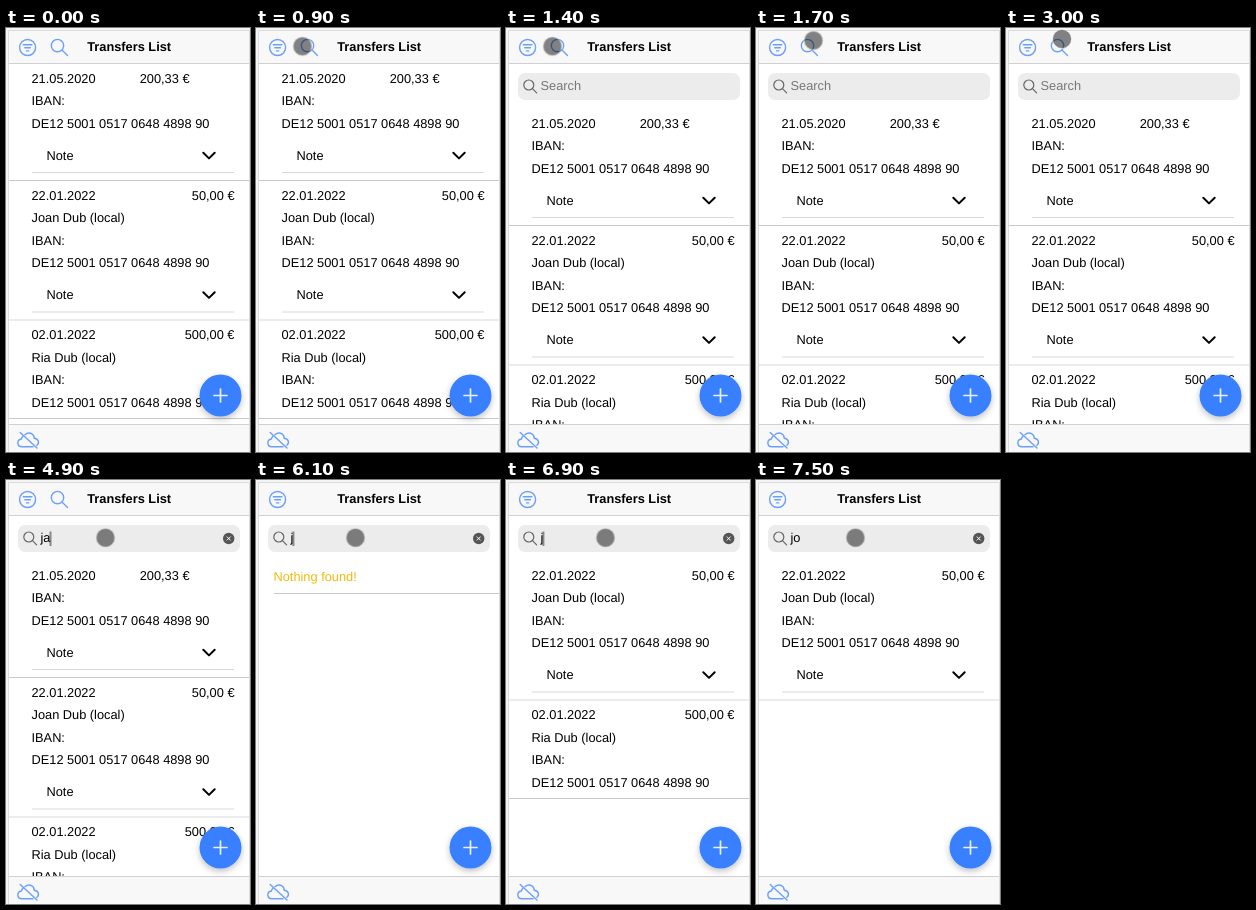
Write an HTML page that moves like this. It is 244 px wide and 424 px high and loops after 8 s.

```html
<!DOCTYPE html>
<html lang="en">
<head>
<meta charset="utf-8">
<title>Transfers List</title>
<style>
html, body { margin: 0; width: 100%; height: 100%; overflow: hidden; background: #f4f4f4; }
svg { display: block; width: 244px; height: 424px; }
text { font: 12.8px "Liberation Sans", Arial, sans-serif; fill: #000; text-rendering: geometricPrecision; }
.title { font-weight: bold; }
.end { text-anchor: end; }
.icon { fill: none; stroke: #6a9ffb; stroke-width: 1.4; stroke-linecap: round; stroke-linejoin: round; }
.rule { stroke: #d9d9db; }
.strong { stroke: #c8c8cb; }

.anim, .anim * { animation: 8s step-end infinite; }
.list { animation-name: list; }
.first, .glass { animation-name: until-search; }
.second { animation-name: second; }
.third { animation-name: third; }
.field { animation-name: field; }
.empty { animation-name: empty; }
.hint { animation-name: hint; }
.typed { animation-name: typed; }
.a { animation-name: letter-a; }
.o { animation-name: letter-o; }
.caret { animation-name: caret; }
.pointer { animation-name: pointer; }

@keyframes list {
  0% { transform: translateY(0); }
  17.5% { transform: translateY(45px); }
  80%, 100% { transform: translateY(-72px); }
}
@keyframes until-search { 0% { opacity: 1; } 65%, 100% { opacity: 0; } }
@keyframes second { 0% { opacity: 1; } 65% { opacity: 0; } 80%, 100% { opacity: 1; } }
@keyframes third { 0% { opacity: 1; } 65% { opacity: 0; } 80% { opacity: 1; } 91.25%, 100% { opacity: 0; } }
@keyframes field { 0% { opacity: 0; } 17.5%, 100% { opacity: 1; } }
@keyframes empty { 0% { opacity: 0; } 65% { opacity: 1; } 80%, 100% { opacity: 0; } }
@keyframes hint { 0% { opacity: 1; } 58.75%, 100% { opacity: 0; } }
@keyframes typed { 0% { opacity: 0; } 58.75%, 100% { opacity: 1; } }
@keyframes letter-a { 0% { opacity: 0; } 61.25% { opacity: 1; } 76.25%, 100% { opacity: 0; } }
@keyframes letter-o { 0% { opacity: 0; } 87.5%, 100% { opacity: 1; } }
@keyframes caret {
  0% { opacity: 0; transform: translateX(0); }
  48.75% { opacity: 1; transform: translateX(0); }
  55% { opacity: 0; transform: translateX(0); }
  58.75% { opacity: 1; transform: translateX(2.4px); }
  61.25% { opacity: 1; transform: translateX(9.5px); }
  67.5% { opacity: 0; transform: translateX(9.5px); }
  73.75% { opacity: 1; transform: translateX(9.5px); }
  76.25% { opacity: 1; transform: translateX(2.4px); }
  81.25% { opacity: 0; transform: translateX(2.4px); }
  86.25% { opacity: 1; transform: translateX(2.4px); }
  87.5% { opacity: 1; transform: translateX(9.5px); }
  93.75%, 100% { opacity: 0; transform: translateX(9.5px); }
}
@keyframes pointer {
  0% { transform: translate(-20px, 18.5px); }
  7.5% { transform: translate(4px, 18.5px); }
  8.75% { transform: translate(24px, 18.5px); }
  10% { transform: translate(40px, 18.5px); }
  11.25% { transform: translate(46.5px, 18.3px); }
  18.75% { transform: translate(49px, 17px); }
  20% { transform: translate(54px, 14px); }
  21.25% { transform: translate(57.5px, 12.5px); }
  37.5% { transform: translate(56px, 11px); }
  40% { transform: translate(62px, 22px); }
  41.25% { transform: translate(84px, 60px); }
  42.5% { transform: translate(101px, 88px); }
  43.75% { transform: translate(97.2px, 77.3px); }
  45% { transform: translate(102px, 58.3px); }
  47.5% { transform: translate(101px, 58px); }
  48.75%, 100% { transform: translate(99.5px, 57.7px); }
}
</style>
</head>
<body>
<svg viewBox="0 0 244 424">
  <defs>
    <clipPath id="view"><path d="M3 36H243V396H3z"/></clipPath>
    <filter id="shadow" x="-50%" y="-50%" width="200%" height="200%">
      <feDropShadow dx="0" dy="2.5" stdDeviation="3" flood-opacity=".25"/>
    </filter>
    <g id="note">
      <text x="40.5" y="131.5">Note</text>
      <path d="M197.3 124.7L203 130.4L208.7 124.7" fill="none" stroke="#000" stroke-width="2" stroke-linecap="round" stroke-linejoin="round"/>
      <path class="rule" d="M26 144.5H228"/>
    </g>
  </defs>

  <path fill="#fff" stroke="#dcdcdc" d="M2.5 430V2.5H243.5V430z"/>

  <g class="anim" clip-path="url(#view)">
    <g class="list">
      <g class="first">
        <text y="55.3"><tspan x="25.5">21.05.2020</tspan><tspan x="133.7">200,33 €</tspan></text>
        <text x="25.5" y="77.4">IBAN:</text>
        <text x="25.5" y="100.2">DE12 5001 0517 0648 4898 90</text>
        <use href="#note"/>
        <path class="strong" d="M3 152.5H243"/>
      </g>
      <g class="second">
        <text x="25.5" y="172">22.01.2022</text>
        <text class="end" x="228.5" y="172">50,00 €</text>
        <text x="25.5" y="194.4">Joan Dub (local)</text>
        <text x="25.5" y="216.9">IBAN:</text>
        <text x="25.5" y="239.3">DE12 5001 0517 0648 4898 90</text>
        <use href="#note" y="139.5"/>
        <path class="rule" d="M3 292H243"/>
      </g>
      <g class="third">
        <text x="25.5" y="311.3">02.01.2022</text>
        <text class="end" x="228.5" y="311.3">500,00 €</text>
        <text x="25.5" y="333.8">Ria Dub (local)</text>
        <text x="25.5" y="356.2">IBAN:</text>
        <text x="25.5" y="378.7">DE12 5001 0517 0648 4898 90</text>
        <path class="strong" d="M3 390.5H243"/>
      </g>
    </g>

    <g class="empty">
      <text x="17.5" y="101.3" style="fill:#f2b90c">Nothing found!</text>
      <path class="strong" d="M18 113.5H243"/>
    </g>

    <g class="field">
      <rect x="12" y="45" width="222" height="27" rx="7" fill="#ececec"/>
      <g fill="none" stroke="#666" stroke-width="1.2" stroke-linecap="round">
        <circle cx="22.8" cy="57" r="5"/><path d="M26.5 60.7L30.6 64.8"/>
      </g>
      <text class="hint" x="34.5" y="62.3" style="fill:#777">Search</text>
      <g class="typed">
        <text x="34.5" y="62.3">j</text>
        <text class="a" x="37.35" y="62.3">a</text>
        <text class="o" x="37.35" y="62.3">o</text>
        <circle cx="222.7" cy="58.5" r="5.7" fill="#555"/>
        <path d="M220.8 56.6l3.8 3.8m0-3.8l-3.8 3.8" stroke="#fff"/>
      </g>
      <path class="caret" d="M35 51.5V66" stroke="#222"/>
    </g>
  </g>

  <path fill="#f8f8f8" d="M3 3H243V36H3zM3 396H243V424H3z"/>
  <path stroke="#d0d0d0" d="M3 35.5H243M3 396.5H243"/>
  <text class="title" x="81.2" y="23.2">Transfers List</text>

  <g class="icon anim">
    <circle cx="21.6" cy="19.5" r="8"/>
    <path d="M17.3 16.7h8.6M18.8 19.8h5.6M20.5 22.9h2.2"/>
    <g class="glass"><circle cx="51.5" cy="17.6" r="6.2"/><path d="M56 22.1L61.5 27.5"/></g>
    <path d="M14.2 404.5L31 420M19 406.6C24 403 28.2 406.5 28.2 410.2C32.6 410.7 33.7 415 30.9 417.3M16.7 408.6C15.9 409.4 15.6 410.2 15.4 411C10.5 411.8 10.7 418.7 15.9 418.7H27"/>
  </g>

  <circle cx="214.5" cy="367.5" r="21" fill="#3880ff" filter="url(#shadow)"/>
  <path d="M208 367.5h13M214.5 361v13" stroke="#e8f0ff" stroke-width="1.7" stroke-linecap="round"/>

  <g class="anim">
    <circle class="pointer" r="9.5" fill="#000" fill-opacity=".48" stroke="#fff" stroke-opacity=".6"/>
  </g>
</svg>
</body>
</html>
```
